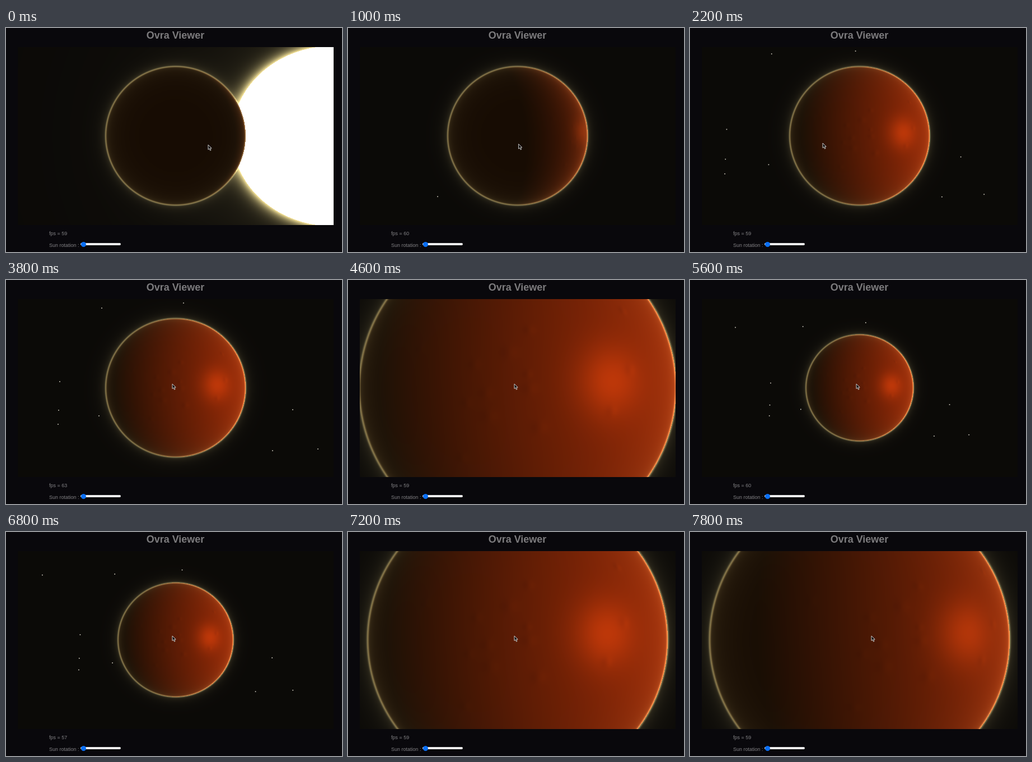
An HTML page with a canvas for the animation above (8 s loop, 600x399 px).

```html
<!DOCTYPE html>
<html lang="en">
<head>
<meta charset="utf-8">
<title>Ovra Viewer</title>
<style>
  html, body { margin: 0; width: 100%; height: 100%; overflow: hidden; background: #09080c; }
  body { position: relative; font-family: "Liberation Sans", Arial, sans-serif; }
  body > * { position: absolute; }
  h1 { left: 0; top: 3px; width: 605px; margin: 0; text-align: center; font-size: 18px; line-height: 20px; color: #7c7b7d; }
  .label { left: 77px; font-size: 9px; line-height: 12px; color: #828184; white-space: pre; }
  #view { left: 21px; top: 34px; }
  #track { left: 133px; top: 383px; width: 72px; height: 4px; border-radius: 2px; background: #eeeeef; }
  #knob { left: 133.5px; top: 380.7px; width: 9px; height: 9px; border-radius: 50%; background: #0a6ff5; }
  #cursor { left: -1px; top: -1px; }
</style>
</head>
<body>
<h1>Ovra Viewer</h1>
<canvas id="view" width="564" height="317"></canvas>
<div class="label" id="fps" style="top:360px">fps = 59</div>
<div class="label" style="top:381px">Sun rotation :</div>
<div id="track"></div>
<div id="knob"></div>
<svg id="cursor" width="10" height="14" viewBox="0 0 10 14">
  <path d="M1 1V9.6L3 7.8L4.5 11.2L6 10.5L4.6 7.2H7.2Z" fill="#111" stroke="#ddd" stroke-width=".9"/>
</svg>
<script>
const LOOP = 8000, STEP = 200;
const DEG = Math.PI / 180;
const CX = 282, CY = 158, SQUASH = .988;   // planet centre and height ratio in the view
const REST_RADIUS = 125, REST_FOCAL = 341, REST_LIGHT = 62;
const DIST = 2.92, SPREAD = Math.sqrt(DIST * DIST - 1);

// Key poses as [time, value]
const poses = {
  light: [[0, 150], [2200, 65.6], [3400, 62], [7200, 62], [7800, 76]],
  radius: [[0, 125], [3800, 125], [4600, 283], [4800, 283], [5600, 96], [6400, 90], [6800, 103], [7200, 268]],
  cursorX: [[0, 361], [2200, 237], [2800, 237], [3600, 297], [7200, 297], [7800, 324]],
  cursorY: [[0, 208], [2200, 205], [3600, 185]]
};
const fpsEachSecond = [59, 60, 59, 63, 59, 60, 57, 59];

function pose(name, t) {
  const keys = poses[name], i = keys.findIndex(key => key[0] > t);
  if (i < 0) return keys[keys.length - 1][1];
  const [t0, a] = keys[i - 1], [t1, b] = keys[i];
  return a + (b - a) * (t - t0) / (t1 - t0);
}

let seed = 7;
function random(min, max) {
  seed = (seed * 16807) % 2147483647;
  return min + (max - min) * seed / 2147483647;
}

function spin([x, y, z], angle) {
  const c = Math.cos(angle), s = Math.sin(angle);
  return [x * c + z * s, y, z * c - x * s];
}

// Point on the unit sphere seen at (u, v), in units of the visible radius.
function surface(u, v) {
  const kx = u / SPREAD, ky = v / SPREAD, q = 1 + kx * kx + ky * ky;
  const t = (DIST - Math.sqrt(Math.max(0, DIST * DIST - q * (DIST * DIST - 1)))) / q;
  return [kx * t, ky * t, DIST - t];
}

// Bright stars ahead at the rest pose, then scattered ones for the far side of the sky.
const stars = [[-207, -11], [-209, 40], [-210, 65], [-137, 50], [-132, -142], [14, -151], [209, 39],
  [173, 112], [254, 109], [-289, -140]].map(([x, y]) => ({ at: [x / REST_FOCAL, y / REST_FOCAL, 1], glow: .9 }));
for (let i = 0; i < 12; i++) {
  const far = [0, random(-.45, .45), 1];
  stars.push({ at: spin(far, random(-125, -55) * DEG), glow: random(.4, .9) });
}

const craters = Array.from({ length: 14 }, () => ({
  at: surface(random(-.7, .8), random(-.55, .55)), size: random(.016, .034)
}));

function relief(n, spots) {
  let sum = 0;
  for (const { at, size } of spots) {
    const dx = (n[0] - at[0]) / size, dy = (n[1] - at[1]) / size, dz = (n[2] - at[2]) / size;
    const d2 = dx * dx + dy * dy + dz * dz;
    if (d2 < 6) sum += dx * Math.exp(-d2);
  }
  return sum;
}

function planetColor(u, v, light, spots) {
  const n = surface(u, v);
  const lit = n[0] * light[0] + n[1] * light[1] + n[2] * light[2];
  const len = Math.hypot(n[0], n[1], DIST - n[2]);
  const view = [-n[0] / len, -n[1] / len, (DIST - n[2]) / len];
  const facing = n[0] * view[0] + n[1] * view[1] + n[2] * view[2];
  const half = light.map((value, i) => value + view[i]);
  const gloss = Math.max(0, (n[0] * half[0] + n[1] * half[1] + n[2] * half[2]) / Math.hypot(...half));
  const day = Math.pow(Math.max(0, (lit + .3) / 1.3), 1.15);
  const spec = Math.pow(gloss, 42) * Math.max(0, Math.min(1, lit * 1.3));
  const haze = Math.pow(1 - Math.max(0, facing), 2.2);
  const bump = relief(n, spots) * 20 * day;
  return [
    23 + 128 * day + 58 * spec + 26 * haze + bump,
    12 + 29 * day + 18 * spec + 26 * haze + bump * .35,
    3 + 3 * day + 3 * spec + 17 * haze
  ];
}

function sunAt(angle, focal, zoom) {
  const turn = (189.4 - angle) * DEG, depth = Math.cos(turn);
  if (depth < .2) return null;
  const ry = 124 * zoom / depth;
  return { x: CX + focal * Math.tan(turn), rx: ry * 1.12, ry };
}

// Distance from the sun's edge, negative inside.
function sunGap(sun, x, y) {
  return (Math.hypot((x - sun.x) / sun.rx, (y - CY) / sun.ry) - 1) * sun.ry;
}

function skyColor(x, y, gap, radius, sun) {
  const halo = Math.exp(-gap / (radius * .08));
  let near = 0, wide = 0;
  if (sun) {
    const edge = sunGap(sun, x, y);
    near = edge < 0 ? 2 : Math.exp(-edge / 9);
    wide = Math.exp(-Math.max(0, edge) / 90);
  }
  return [
    11 + 25 * halo + 215 * near + 26 * wide,
    9.5 + 23 * halo + 200 * near + 24 * wide,
    7 + 15 * halo + 135 * near + 15 * wide
  ];
}

const ctx = document.getElementById('view').getContext('2d');
const { width, height } = ctx.canvas;
const image = ctx.createImageData(width, height);

function drawScene(angle, radius) {
  const theta = angle * DEG, zoom = radius / REST_RADIUS, focal = REST_FOCAL * zoom;
  const light = [Math.sin(theta), -.06, Math.cos(theta)];
  const spots = craters.map(({ at, size }) => ({ at: spin(at, (angle - REST_LIGHT) * DEG), size }));
  const sun = sunAt(angle, focal, zoom);
  const rimWidth = 1 + radius * .004;

  for (let y = 0, i = 0; y < height; y++) {
    for (let x = 0; x < width; x++, i += 4) {
      const u = (x + .5 - CX) / radius, v = (y + .5 - CY) / (radius * SQUASH);
      const gap = (Math.hypot(u, v) - 1) * radius;
      const color = gap < 0 ? planetColor(u, v, light, spots) : skyColor(x, y, gap, radius, sun);
      const rim = Math.exp(-((gap / rimWidth) ** 2)) + .2 * Math.exp(-Math.abs(gap) / (2 + radius * .014));
      const gain = rim * (.72 + .12 * Math.max(0, u * light[0] + .4 * light[2]));
      image.data.set([color[0] + 106 * gain, color[1] + 96 * gain, color[2] + 62 * gain, 255], i);
    }
  }
  ctx.putImageData(image, 0, 0);
  drawStars(angle, focal, radius, sun);
}

function drawStars(angle, focal, radius, sun) {
  for (const { at, glow } of stars) {
    const [dx, dy, dz] = spin(at, (REST_LIGHT - angle) * DEG);
    if (dz < .1) continue;
    const x = CX + focal * dx / dz, y = CY + focal * dy / dz;
    const hidden = Math.hypot(x - CX, y - CY) < radius + 2 || (sun && sunGap(sun, x, y) < 0);
    if (hidden) continue;
    ctx.fillStyle = `rgba(245,240,225,${glow})`;
    ctx.fillRect(x - .8, y - .8, 1.6, 1.6);
  }
}

const cursor = document.getElementById('cursor');
const fps = document.getElementById('fps');
const start = performance.now();
let shown = -1;

function frame() {
  const t = Math.floor((performance.now() - start) % LOOP / STEP) * STEP;
  if (t !== shown) {
    shown = t;
    drawScene(pose('light', t), pose('radius', t));
    cursor.style.transform = `translate(${pose('cursorX', t)}px, ${pose('cursorY', t)}px)`;
    fps.textContent = `fps = ${fpsEachSecond[Math.floor(t / 1000)]}`;
  }
  requestAnimationFrame(frame);
}
frame();
</script>
</body>
</html>
```
